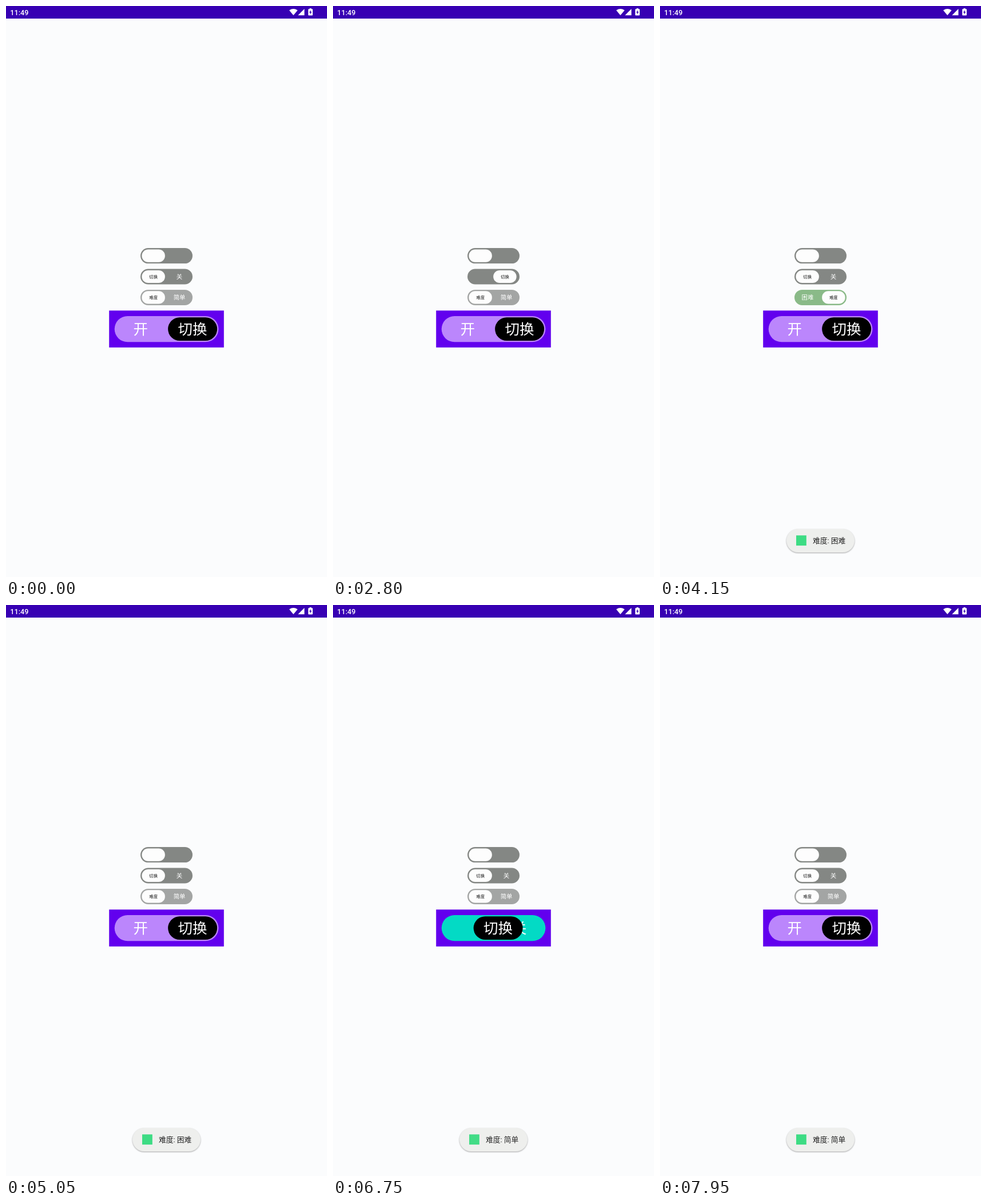
These frames come from a looping animation (561x998 px, 8500 ms). An HTML page:

```html
<!DOCTYPE html>
<html lang="zh-CN">
<head>
<meta charset="utf-8">
<title>Toggle switches</title>
<style>
  html, body { margin: 0; width: 100%; height: 100%; overflow: hidden; background: #fbfcfd; }
  svg { display: block; font-family: Roboto, "Noto Sans CJK SC", "Noto Sans CJK", sans-serif; }
  .card { fill: #eeefed; filter: drop-shadow(0 1.5px 1.2px rgba(0, 0, 0, .35)); }
</style>
</head>
<body>
<svg id="stage" width="561" height="998" viewBox="0 0 561 998">
  <rect width="561" height="22" fill="#3700b3"/>
  <g fill="#fff">
    <text x="7.3" y="16" font-size="12.7" font-weight="500">11:49</text>
    <path d="M502.3 16.2L495 7.4Q502.3 2.6 509.6 7.4Z"/>
    <path d="M521.5 5V16.2H510.3Z"/>
    <path d="M530.6 4h3v1.2h1.4q1 0 1 1v9.3q0 1-1 1h-5.8q-1 0-1-1V6.200q0-1 1-1h1.400z"/>
  </g>
  <path d="M532.7 7.200L529.9 11.600H531.600V14.700L534.300 10.300H532.700Z" fill="#3700b3"/>
  <rect x="180.200" y="532.300" width="200.600" height="64.500" fill="#6200ee"/>
  <g id="switches"></g>
  <g id="toast">
    <rect class="card" x="221" y="914" width="119" height="41" rx="20.500"/>
    <g id="content">
      <rect x="238" y="925.300" width="17.800" height="17.800" fill="#3ddc84"/>
      <text id="message" x="267" y="939.300" font-size="12.730" fill="#222"></text>
    </g>
  </g>
</svg>
<script>
const LOOP = 8500, STEP = 50;
const $ = id => document.getElementById(id);
const clamp = v => Math.min(1, Math.max(0, v));
const progress = (t, start, length) => clamp((t - start) / length);

function add(parent, tag, attrs, text = '') {
  const node = document.createElementNS('http://www.w3.org/2000/svg', tag);
  for (const key in attrs) node.setAttribute(key, attrs[key]);
  node.textContent = text;
  parent.append(node);
  return node;
}

function label(parent, text, x, cy, size, fill) {
  return add(parent, 'text', {
    x, y: cy + size * 0.38, 'font-size': size, fill, 'text-anchor': 'middle'
  }, text);
}

const small = { x: 235, w: 91, h: 27, pad: 2.4, thumbW: 40.5, thumbSize: 7.3, size: 10.4,
                thumb: '#fdfdfd', ink: '#111', on: '#65a562', off: '#848784' };
const large = { x: 189.7, w: 181.7, h: 45.4, pad: 2.3, thumbW: 86, thumbSize: 25.5, size: 25.5,
                thumb: '#000', ink: '#fff', on: '#bb86fc', off: '#03dac5' };

// Each move is [start, end] in ms and flips the switch.
const switches = [
  { ...small, cy: 436.600, texts: ['', '', ''], moves: [[390, 600], [1235, 1540]] },
  { ...small, cy: 473, texts: ['切换', '开', '关'], moves: [[2051, 2350], [2751, 3050]] },
  { ...small, cy: 509.400, texts: ['难度', '困难', '简单'], on: '#8aba88', off: '#a3a5a4',
    moves: [[3751, 4050], [4751, 5050]] },
  { ...large, cy: 564.600, texts: ['切换', '开', '关'], startOn: true,
    moves: [[6617, 6917], [7351, 7650]] }
].map(s => {
  const [name, onText, offText] = s.texts;
  const { x, w, h, cy, pad, thumbW } = s;
  const g = $('switches');
  const side = pad + thumbW / 2;
  s.track = add(g, 'rect', { x, y: cy - h / 2, width: w, height: h, rx: h / 2 });
  s.onLabel = label(g, onText, x + side + 0.3, cy, s.size, '#fff');
  s.offLabel = label(g, offText, x + w - side - 0.3, cy, s.size, '#fff');
  s.knob = add(g, 'g', {});
  const th = h - pad * 2;
  add(s.knob, 'rect', { x: x + pad, y: cy - th / 2, width: thumbW, height: th, rx: th / 2, fill: s.thumb });
  label(s.knob, name, x + side, cy, s.thumbSize, s.ink);
  s.travel = w - pad * 2 - thumbW;
  return s;
});

const toasts = [
  { text: '难度: 困难', show: 3815, hide: 6148 },
  { text: '难度: 简单', show: 6425, hide: Infinity }
];

function drawSwitch(s, t) {
  let on = !!s.startOn, pos = on ? 1 : 0;
  for (const [start, end] of s.moves) {
    if (t < start) break;
    const eased = (1 - Math.cos(Math.PI * progress(t, start, end - start))) / 2;
    on = !on;
    pos = on ? eased : 1 - eased;
  }
  s.track.setAttribute('fill', on ? s.on : s.off);
  s.onLabel.style.display = on ? '' : 'none';
  s.offLabel.style.display = on ? 'none' : '';
  s.knob.setAttribute('transform', `translate(${s.travel * pos} 0)`);
}

function drawToast(t) {
  const toast = toasts.find(o => t >= o.show && t < o.hide + 250);
  $('toast').style.display = toast ? '' : 'none';
  if (!toast) return;
  const { text, show, hide } = toast;
  const enter = progress(t, show, 333), leave = progress(t, hide, 250);
  const scale = 0.9 + 0.1 * (3 * enter ** (2 / 3) - 2 * enter) - 0.1 * leave ** 1.4;
  $('message').textContent = text;
  $('toast').setAttribute('transform',
    `translate(280.5 934.5) scale(${scale}) translate(-280.5 -934.5)`);
  $('toast').style.opacity = progress(t, show, 66) * (1 - progress(t, hide + 150, 100));
  $('content').style.opacity = progress(t, show + 50, 283) * (1 - progress(t, hide, 172));
}

function frame() {
  const t = Math.floor(performance.now() % LOOP / STEP) * STEP;
  switches.forEach(s => drawSwitch(s, t));
  drawToast(t);
  requestAnimationFrame(frame);
}
frame();
</script>
</body>
</html>
```
